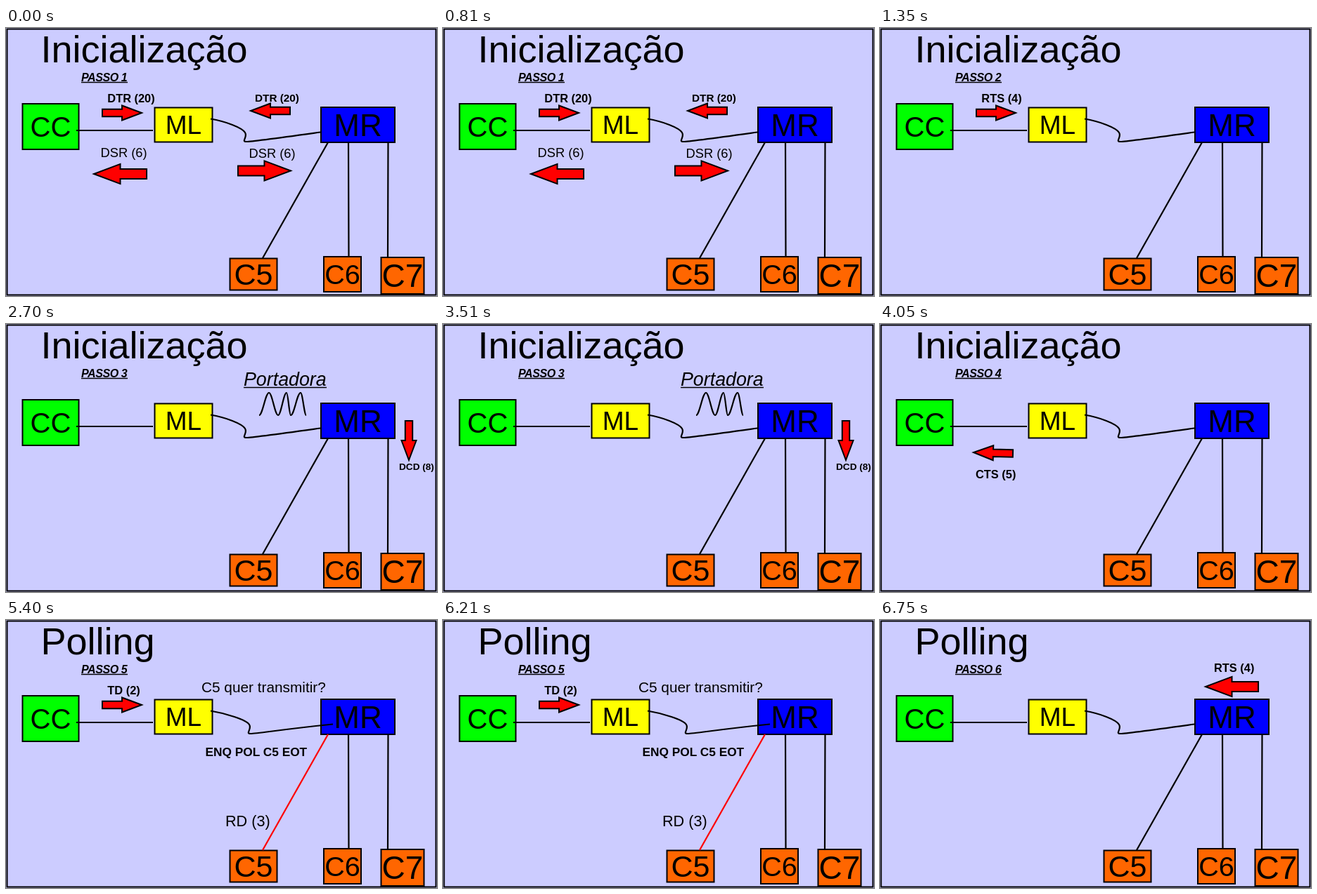
An HTML page that plays this animation: 613 px wide and 382 px high, repeating every 8 s.

```html
<!DOCTYPE html>
<html lang="pt">
<head>
<meta charset="utf-8">
<title>Passos</title>
<style>
html, body { margin: 0; width: 100%; height: 100%; overflow: hidden; background: #ccccff; }
svg { display: block; width: 613px; height: 382px; font-family: "Liberation Sans", Arial, sans-serif; }
.ink { fill: none; stroke: #000; stroke-width: 2.2; }
.thin { stroke-width: 1.3; }
.edge { stroke: #000; stroke-width: 2; }
.bold { font-weight: 700; }
.slant { font-style: italic; }
.step { font-weight: 700; font-style: italic; letter-spacing: -0.4px; }
.label { text-anchor: middle; }
</style>
</head>
<body>
<svg id="stage" viewBox="0 0 613 382"></svg>
<script>
const NS = "http://www.w3.org/2000/svg";
const stage = document.getElementById("stage");
const STEP = 1350, LOOP = 8000;

function add(parent, tag, attrs, content) {
  const el = document.createElementNS(NS, tag);
  for (const k in attrs) el.setAttribute(k, attrs[k]);
  if (content) el.textContent = content;
  parent.appendChild(el);
  return el;
}

const text = (g, str, x, y, size, cls = "") =>
  add(g, "text", { x, y, "font-size": size, class: cls }, str);
const bold = (g, str, x, y, size = 16.4) => text(g, str, x, y, size, "bold");
const line = (g, d, cls = "") => add(g, "path", { d, class: "ink " + cls });

// Box with its label centred inside
function box(label, fill, x, y, width, height, size) {
  add(stage, "rect", { x, y, width, height, fill, class: "edge" });
  text(stage, label, x + width / 2, y + height / 2 + 0.355 * size, size, "label");
}

// Block arrow with its tip at (x, y)
function arrow(g, x, y, angle, scale = 1) {
  const [len, head, wing, half] = [56, 28, 10.5, 5.2].map(v => v * scale);
  add(g, "path", {
    d: `M0 0L${-head} ${-wing}V${-half}H${-len}V${half}H${-head}V${wing}Z`,
    transform: `translate(${x} ${y}) rotate(${angle})`,
    fill: "#f00", class: "edge"
  });
}
const BIG = 1.34;

// Signal from CC to ML
function send(g, name) {
  bold(g, name, 144.3, 106);
  arrow(g, 193, 121, 0);
}

// Smooth stroke swinging between peaks and valleys
function swing(g, xs, top, bottom) {
  const d = xs.slice(1).map((x, i) => {
    const x0 = xs[i], bend = (x - x0) * 0.35;
    const [y0, y1] = i % 2 ? [top, bottom] : [bottom, top];
    return `C${x0 + bend} ${y0} ${x - bend} ${y1} ${x} ${y1}`;
  });
  line(g, `M${xs[0]} ${bottom}` + d.join(""));
}

// Cable from ML: a knee shifted by dx, then a run to (endX, 148.5)
const cablePath = (dx, endX) =>
  `M291 129.5C312 133 ${336 + dx} 142 ${340 + dx} 149` +
  `S${334 + dx} 162 ${342 + dx} 162S400 155 ${endX} 148.5`;

add(stage, "rect", { x: 1.5, y: 1.5, width: 610, height: 379, fill: "#ccccff", class: "edge" });
const title = text(stage, "", 49.5, 49, 54);
const step = text(stage, "", 107, 76, 16, "step");
line(stage, "M107 77.5H173", "thin");

box("CC", "#00ff00", 23.5, 108, 80, 65, 40);
box("ML", "#ffff00", 211.5, 113.5, 82, 49, 37);
box("MR", "#0000ff", 448, 113, 105, 50, 44);
box("C5", "#ff6600", 318.5, 328.5, 67, 45, 43);
box("C6", "#ff6600", 452, 326, 53, 50, 39.5);
box("C7", "#ff6600", 533.5, 327, 61, 52, 46);

line(stage, "M100 146H209");
line(stage, "M487 163L487.5 326M543.5 163L543 327");
const branch = line(stage, "M458 163L365 328");
const cable = line(stage, "");

const scenes = [
  g => {
    send(g, "DTR (20)");
    bold(g, "DTR (20)", 354, 105, 15.3);
    arrow(g, 348, 118, 180);
    text(g, "DSR (6)", 134.5, 184, 18.3);
    arrow(g, 125, 208, 180, BIG);
    text(g, "DSR (6)", 345.5, 185, 18.3);
    arrow(g, 405, 203.5, 0, BIG);
  },
  g => send(g, "RTS (4)"),
  g => {
    text(g, "Portadora", 338, 88, 26.8, "slant");
    line(g, "M338 90.5H456", "thin");
    swing(g, [360, 374, 387, 399, 405, 419, 427], 98, 130);
    arrow(g, 573, 194, 90);
    bold(g, "DCD (8)", 559, 207.5, 13.6);
  },
  g => {
    arrow(g, 133, 183, 181.5);
    bold(g, "CTS (5)", 136, 220);
  },
  g => {
    send(g, "TD (2)");
    text(g, "C5 quer transmitir?", 278, 103, 20.8);
    bold(g, "ENQ POL C5 EOT", 283.5, 194, 17.3);
    text(g, "RD (3)", 312, 294, 21.6);
  },
  g => {
    bold(g, "RTS (4)", 475, 74);
    arrow(g, 463, 95, 180, BIG);
  }
].map(draw => {
  const g = add(stage, "g", {});
  draw(g);
  return g;
});

function render(ms) {
  const n = Math.floor((ms % LOOP) / STEP);
  const asking = n === 4;
  title.textContent = n < 4 ? "Inicialização" : "Polling";
  step.textContent = "PASSO " + (n + 1);
  cable.setAttribute("d", asking ? cablePath(6, 465) : cablePath(0, 447));
  branch.style.stroke = asking ? "#f00" : "#000";
  scenes.forEach((g, i) => g.setAttribute("visibility", i === n ? "visible" : "hidden"));
}

const start = performance.now();
function tick() {
  render(performance.now() - start);
  requestAnimationFrame(tick);
}
render(0);
requestAnimationFrame(tick);
</script>
</body>
</html>
```
